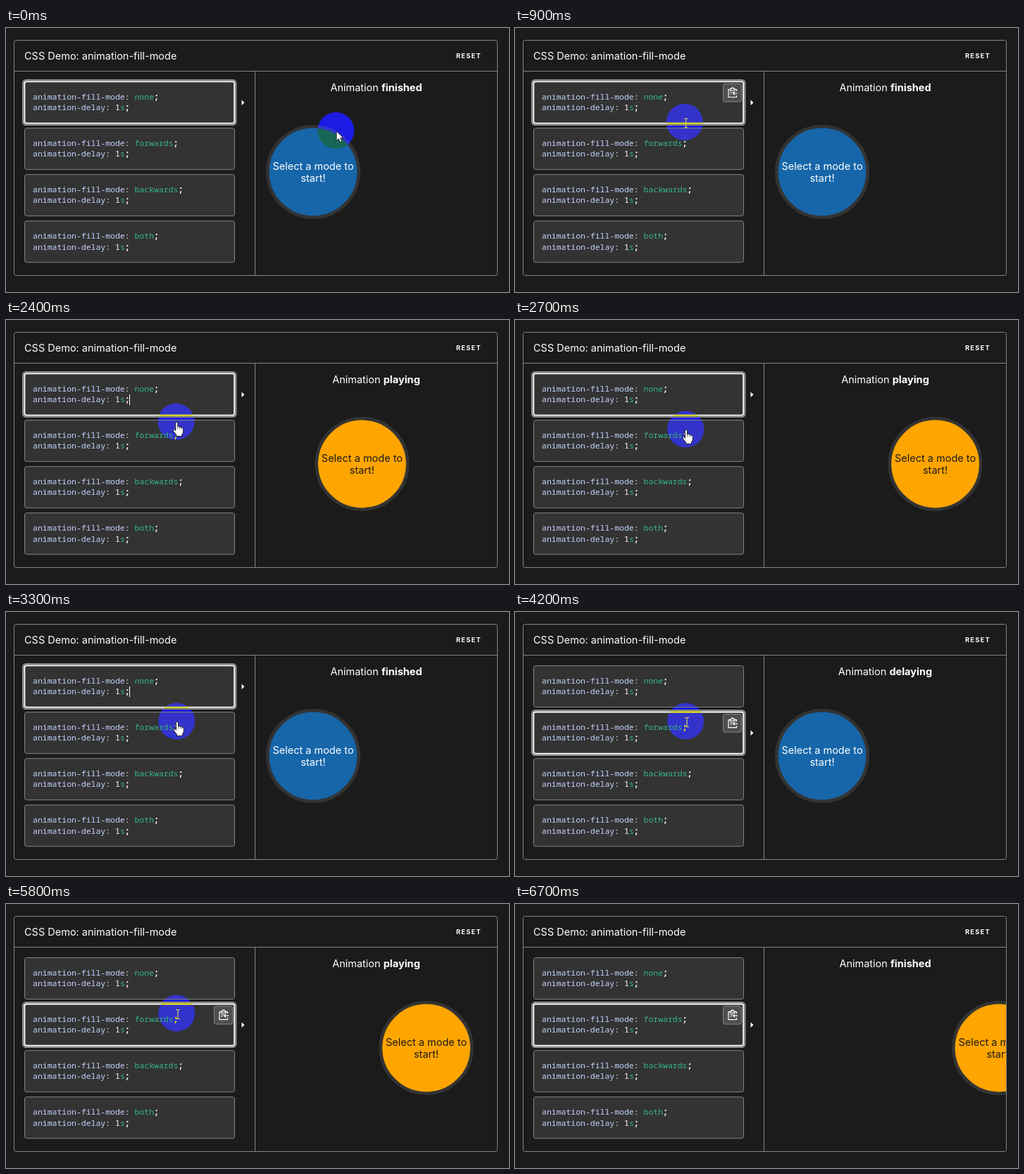
These frames come from a looping animation (714 by 376 pixels, 6800 ms). An HTML page:

```html
<!DOCTYPE html>
<html lang="en">
<head>
<meta charset="utf-8">
<title>animation-fill-mode demo</title>
<style>
  html, body { margin: 0; width: 100%; height: 100%; overflow: hidden; background: #1b1b1b; }
  svg { display: block; width: 714px; height: 376px; background: #1b1b1b; isolation: isolate; }
  text { font-family: Inter, sans-serif; font-size: 14.5px; fill: #fff; }
  .mid { text-anchor: middle; }
  .bold { font-weight: 700; }
  .reset { font-size: 9.2px; font-weight: 700; letter-spacing: 1.3px; }
  .code { font-family: "Noto Sans Mono", monospace; font-size: 11.47px; white-space: pre; }
  .prop { fill: #c4d3ff; }
  .val { fill: #35b595; }
  .line { fill: none; stroke: #858585; }
  .spot { fill: #00f; mix-blend-mode: difference; }
</style>
</head>
<body>
<svg viewBox="0 0 714 376">
  <defs><clipPath id="pane"><rect x="354" y="62" width="343" height="290"/></clipPath></defs>
  <rect class="line" x="11.5" y="17.5" width="686" height="335" rx="3"/>
  <path class="line" d="M12 61.5H697M353.5 62V352"/>
  <text x="26" y="45">CSS Demo: animation-fill-mode</text>
  <text class="reset" x="639" y="43">RESET</text>
  <g id="boxes"></g>
  <g id="focus">
    <rect x="24.5" y="74.5" width="301.5" height="63" rx="4" fill="none" stroke="#8c8c8c" stroke-width="3"/>
    <rect x="26.5" y="76.5" width="297.5" height="59" rx="2.5" fill="none" stroke="#fff" stroke-width="1.6"/>
    <path d="M334.5 102.5L338.5 106.2L334.5 110Z" fill="#fff"/>
    <g id="copy">
      <rect x="295.5" y="79.5" width="26" height="25.5" rx="2.5" fill="#4e4e4e" stroke="#858585"/>
      <g fill="none" stroke="#fff" stroke-width="1.2">
        <path d="M305.5 87.5H303V98.5H314.5V96M312 87.5H314.5V90"/>
        <path d="M305.5 86.5H307.5V85H310V86.5H312V89H305.5Z"/>
        <path d="M305.5 91.5H309M305.5 94H307.5M316 93H309.5M312 90.5L309.5 93L312 95.5"/>
      </g>
    </g>
  </g>
  <path id="caret" d="M175.5 106V121" stroke="#fff"/>
  <text class="mid" x="525.5" y="90">Animation <tspan id="status" class="bold"></tspan></text>
  <g clip-path="url(#pane)">
    <g id="ball">
      <circle cy="205" r="64.7" stroke="#333" stroke-width="4.6"/>
      <text class="mid" y="202">Select a mode to</text>
      <text class="mid" y="219">start!</text>
    </g>
  </g>
  <circle id="spot" class="spot" r="26"/>
  <g id="arrow" fill="#fff" stroke="#111" stroke-width=".8">
    <path d="M0 0V13.5L3.1 10.7L5.2 15.4L7.6 14.3L5.5 9.8H9.8Z"/>
  </g>
  <g id="beam" fill="none" stroke="#d2d25c" stroke-width="1.2">
    <path d="M-3 -6.5H-.8L0 -5.8L.8 -6.5H3M0 -5.8V5.8M-3 6.5H-.8L0 5.8L.8 6.5H3"/>
  </g>
  <g id="hand" fill="#fff" stroke="#111" stroke-width=".9" stroke-linejoin="round">
    <path d="M-1.5 1.2Q-1.4 0 0 0T1.5 1.2V6.2Q3.3 5.5 4.2 7Q5.8 6.4 6.7 7.8Q9 7.4 9.3 9.5V13Q9.3 16 7.5 17.5V20H-.5V18L-4.6 12.8Q-5.6 10.8 -4.4 10.2Q-3.2 9.8 -1.5 12Z"/>
    <path d="M1.5 6V10M4.2 7V10M6.7 8V10.5" fill="none" stroke-width=".6"/>
  </g>
</svg>
<script>
const $ = id => document.getElementById(id);
const LOOP = 6800, STEP = 100, PITCH = 66.1, DELAY = 1000;
const CLICKS = [937, 4037];
const MOVE = 1000, HOME_X = 436, TRAVEL = 251;

$("boxes").innerHTML = ["none", "forwards", "backwards", "both"].map((mode, i) => `
  <g transform="translate(0 ${i * PITCH})">
    <rect x="26.5" y="76.5" width="298" height="59" rx="3" fill="#333" stroke="#858585"/>
    <text class="code" x="38" y="102"><tspan class="prop">animation-fill-mode</tspan>: <tspan class="val">${mode}</tspan><tspan class="bold">;</tspan></text>
    <text class="code" x="38" y="117.3"><tspan class="prop">animation-delay</tspan>: 1<tspan class="val">s</tspan><tspan class="bold">;</tspan></text>
  </g>`).join("");

const within = (t, a, b) => t >= a && t < b;
const progress = (t, a, b) => Math.min(1, Math.max(0, (t - a) / (b - a)));
const smooth = p => p * p * (3 - 2 * p);
const show = (id, on) => $(id).setAttribute("display", on ? "inline" : "none");
const place = (id, x, y) => $(id).setAttribute("transform", `translate(${x} ${y})`);

// cubic-bezier(.42, 0, 1, 1)
function easeIn(x) {
  let lo = 0, hi = 1;
  for (let i = 0; i < 24; i++) {
    const s = (lo + hi) / 2, r = 1 - s;
    if (1.26 * s * r * r + 3 * s * s * r + s * s * s < x) lo = s; else hi = s;
  }
  return 3 * lo * lo - 2 * lo * lo * lo;
}

function drawBall(t) {
  const second = t >= CLICKS[1];
  const run = (t - CLICKS[second ? 1 : 0] - DELAY) / MOVE;
  const clicked = t >= CLICKS[0];
  const status = !clicked || run >= 1 ? "finished" : run < 0 ? "delaying" : "playing";
  const lit = clicked && run >= 0 && (run < 1 || second);
  const ball = $("ball");
  place("ball", lit ? HOME_X + TRAVEL * easeIn(Math.min(1, run)) : HOME_X, 0);
  ball.querySelector("circle").setAttribute("fill", lit ? "#ffa500" : "#1766aa");
  ball.querySelectorAll("text").forEach(e => e.style.fill = lit ? "#1b1b1b" : "#fff");
  $("status").textContent = status;
}

function drawPointer(t) {
  const left = smooth(progress(t, 300, 900));
  const down = smooth(progress(t, 2200, 2600));
  const x = 468.3 - 227.5 * left + 1.4 * down;
  const y = 146 - 12 * left + 21.5 * down;
  const visible = t < 6700;
  const inFirst = x < 325 && y < 137;
  const second = t >= CLICKS[1];
  const kind = second || inFirst ? "beam" : x < 325 && y > 142 ? "hand" : "arrow";
  for (const id of ["arrow", "beam", "hand"]) show(id, visible && id === kind);
  show("spot", visible);
  place("spot", x, y);
  place("arrow", x + .8, y + 1);
  place("beam", x + 1.8, y + 1.5);
  place("hand", x + .8, y + .8);
  place("focus", 0, second ? PITCH : 0);
  show("copy", second || inFirst);
}

function draw(now) {
  const t = Math.floor(now % LOOP / STEP) * STEP;
  drawBall(t);
  drawPointer(t);
  show("caret", within(t, 1000, 1500) || within(t, 2000, 2500) || within(t, 3300, 3800));
}

let start;
function tick(now) {
  start ??= now;
  draw(now - start);
  requestAnimationFrame(tick);
}
draw(0);
requestAnimationFrame(tick);
</script>
</body>
</html>
```
